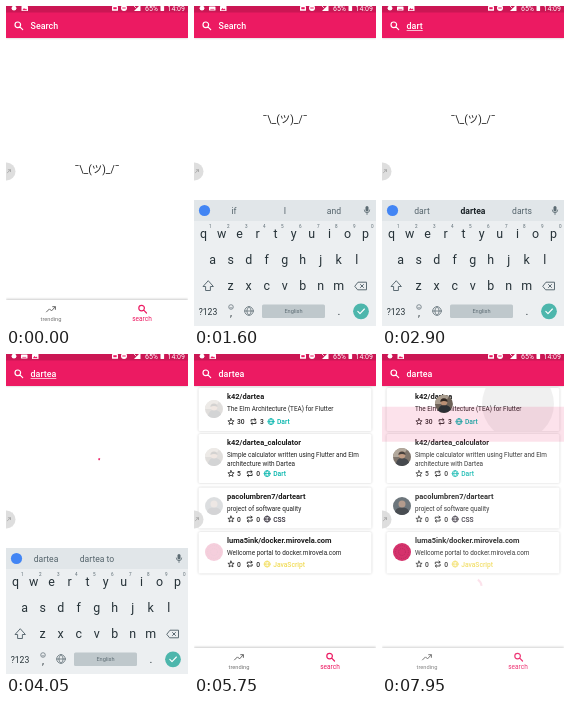
These frames come from a looping animation (182x320 px, 8000 ms). An HTML page:

```html
<!DOCTYPE html>
<html lang="en">
<head>
<meta charset="utf-8">
<title>Repository search</title>
<style>
  html, body { margin: 0; width: 100%; height: 100%; overflow: hidden; background: #fff; }
  svg { display: block; width: 182px; height: 320px; }
  text { font-family: Roboto, "Noto Sans CJK JP", "Noto Sans CJK", sans-serif; white-space: pre; }
  .mid { text-anchor: middle; }
  .bold { font-weight: 700; }
  .semi { font-weight: 500; }
  .line { fill: none; stroke: currentColor; stroke-linecap: round; stroke-linejoin: round; }
  .card { fill: #fff; filter: drop-shadow(0 .6px .8px rgba(0, 0, 0, .2)); }
</style>
</head>
<body>
<svg id="stage" viewBox="0 0 182 320" xmlns="http://www.w3.org/2000/svg"></svg>
<script>
const PINK = '#ec1a62', LOOP = 8000;
const stage = document.getElementById('stage');

const text = (x, y, size, str, fill = '#222', cls = '') =>
  `<text x="${x}" y="${y}" font-size="${size}" fill="${fill}" class="${cls}">${str}</text>`;
const rect = (x, y, w, h, fill, extra = '') =>
  `<rect x="${x}" y="${y}" width="${w}" height="${h}" fill="${fill}" ${extra}/>`;
const dot = (x, y, r, fill, extra = '') =>
  `<circle cx="${x}" cy="${y}" r="${r}" fill="${fill}" ${extra}/>`;
const line = (x, y, d, color, w = 1) =>
  `<path class="line" transform="translate(${x} ${y})" d="${d}" color="${color}" stroke-width="${w}"/>`;
const group = (id, body, extra = '') => `<g id="${id}" ${extra}>${body}</g>`;

const LENS = 'M1.2 1.2L4 4M1.9 -.9A2.8 2.8 0 1 1 -3.7 -.9A2.8 2.8 0 1 1 1.9 -.9';
const GLOBE = 'M3 0A3 3 0 1 1 -3 0A3 3 0 1 1 3 0M-3 0H3M0 -3C-2 -1 -2 1 0 3C2 1 2 -1 0 -3';
const STAR = 'M0 -3L.9 -.9L3.1 -.8L1.4 .6L2 2.8L0 1.6L-2 2.8L-1.4 .6L-3.1 -.8L-.9 -.9Z';
const LOOPS = 'M-2.4 -.3V-1.9H2.3M1.2 -3L2.4 -1.9L1.2 -.8M2.4 .3V1.9H-2.3M-1.2 3L-2.4 1.9L-1.2 .8';

function statusBar() {
  return rect(0, 0, 182, 6.5, '#000', 'opacity=".14"') +
    dot(8, 2.2, 2.4, '#fff') +
    group('kbIcon', rect(15, .5, 6.5, 4, '#fff', 'rx=".6"') + rect(16.3, 2.9, 4, .7, PINK)) +
    group('picIcon', rect(15.5, 0, 6.5, 5, '#fff', 'rx=".5"') + `<path d="M16.3 4.2L18 2L19.2 3.3L20 2.6L21.2 4.2Z" fill="${PINK}"/>`) +
    rect(106, 0, 6, 4.8, '#fff', 'rx=".6"') + rect(107.3, 1.2, 3.4, 2, PINK) +
    dot(118, 2, 3, '#fff') + rect(116.3, 1.5, 3.4, 1, PINK) +
    '<path d="M128 5H134.500V-1.500Z" fill="#fff"/>' + line(128, 1, 'M0 -1L2 1', '#fff', .8) +
    text(139, 4.7, 7, '65%', '#fff') + rect(154.5, 0, 3.6, 5, '#fff', 'rx=".4"') +
    text(161.5, 4.7, 7, '14:09', '#fff');
}

// Flat stand-ins for the profile pictures, centred on the origin
const AVATARS = [
  dot(0, 0, 9, '#6d6258') + '<path d="M-9 0A9 9 0 0 1 5 -7.500L0 0Z" fill="#a99d8f"/>' +
    '<path d="M-6 6.700Q-5 1 0 1Q6 1 7 5.600A9 9 0 0 1 -6 6.700Z" fill="#2c3035"/>' +
    dot(0, -2, 3.4, '#b98f74') + '<path d="M-3.600 -2A3.600 3.600 0 0 1 3.600 -2Q0 -4 -3.600 -2Z" fill="#2f2723"/>',
  dot(0, 0, 9, '#59636a') + '<path d="M-7 5.600Q-6 1.500 0 1.500Q6 1.500 7 5.600A9 9 0 0 1 -7 5.600Z" fill="#30343a"/>' + dot(0, -2, 3.5, '#a98d7d'),
  dot(0, 0, 9, '#cf1557') + dot(0, 0, 6.5, 'none', 'stroke="#b30f4b" stroke-width="1" stroke-dasharray="1 1"') +
    dot(0, 0, 3.5, 'none', 'stroke="#b30f4b" stroke-width="1" stroke-dasharray="1 1"')
];

const REPOS = [
  { top: 34, h: 43, name: 'k42/dartea', desc: ['The Elm Architecture (TEA) for Flutter'], stars: 30, forks: 3, lang: 'Dart', color: '#00b4ab', face: 0, cy: 55 },
  { top: 80, h: 49, name: 'k42/dartea_calculator', desc: ['Simple calculator written using Flutter and Elm', 'architecture with Dartea'], stars: 5, forks: 0, lang: 'Dart', color: '#00b4ab', face: 0, cy: 103 },
  { top: 133.5, h: 41, name: 'pacolumbren7/darteart', desc: ['project of software quality'], stars: 0, forks: 0, lang: 'CSS', color: '#2f2a36', face: 1, cy: 152 },
  { top: 178, h: 41.5, name: 'luma5ink/docker.mirovela.com', desc: ['Wellcome portal to docker.mirovela.com'], stars: 0, forks: 0, lang: 'JavaScript', color: '#f1dc5a', face: 2, cy: 198 }
];

function card(r, i) {
  const base = r.top + 11.2, foot = r.top + r.h - 9.4;
  const x = 52 + 3.8 * (String(r.stars).length - 1);
  const stat = (at, str, color = '#222') => text(at, foot + 2.4, 6.7, str, color, 'semi');
  return rect(4.5, r.top, 173, r.h, '#fff', 'class="card" rx="1.5"') +
    text(33, base, 7.5, r.name, '#1c1c1c', 'bold') +
    r.desc.map((d, n) => text(33, base + 12 + n * 8.3, 6.4, d)).join('') +
    line(37, foot, STAR, '#222', .8) + stat(43, r.stars) +
    line(x + 3.7, foot, LOOPS, '#222', .9) + stat(x + 10.2, r.forks) +
    line(x + 21.2, foot, GLOBE, r.color, .8) + stat(x + 27.2, r.lang, r.color) +
    group('face' + i, AVATARS[r.face], `transform="translate(20 ${r.cy})"`);
}

function keyboard() {
  const ink = '#263238', soft = '#5c6b73';
  let out = rect(0, 194, 182, 126, '#eceff1') + rect(0, 194, 182, 21, '#e1e6e9') +
    dot(10.5, 204.5, 5.6, '#4285f4') +
    rect(171.500, 200, 3, 5.5, soft, 'rx="1.5"') + line(173, 204, 'M-2.700 0A2.700 2.700 0 0 0 2.700 0M0 2.700V4.500', soft, .8);
  [40, 91, 140].forEach((x, i) => out += text(x, 207.8, 8.6, '', '#55646c', 'mid').replace('<text', `<text id="hint${i}"`));
  const row = (keys, x0, y) => [...keys].forEach((k, i) => out += text(x0 + i * 18, y, 12.4, k, ink, 'mid'));
  row('qwertyuiop', 9.6, 231.5);
  row('asdfghjkl', 18.7, 257.5);
  row('zxcvbnm', 36.7, 283.5);
  [...'1234567890'].forEach((n, i) => out += text(16.3 + i * 18, 222, 4.6, n, soft, 'mid'));
  return out +
    line(14, 280, 'M0 -5L-5 .500H-2.400V4.500H2.400V.500H5Z', soft, 1) +
    line(167, 280, 'M-6 0L-3 -3.800H5.500V3.800H-3ZM-.500 -1.500L2.500 1.500M2.500 -1.500L-.500 1.500', soft, 1) +
    text(14, 308.5, 8.6, '?123', ink, 'mid') +
    dot(37, 301, 2.3, 'none', `stroke="${soft}" stroke-width=".7"`) + line(37, 301, 'M-1 .700Q0 1.500 1 .700', soft, .6) +
    text(37, 310, 10, ',', ink, 'mid') +
    line(55, 305, 'M4.300 0A4.300 4.300 0 1 1 -4.300 0A4.300 4.300 0 1 1 4.300 0M-4.300 0H4.300M0 -4.300C-2.800 -1.500 -2.800 1.500 0 4.300C2.800 1.500 2.800 -1.500 0 -4.300', soft, .8) +
    rect(68, 298.5, 63, 13.5, '#bfc8cc', 'rx="1.5"') + text(99.5, 307.4, 5.6, 'English', soft, 'mid') +
    text(145, 308.5, 11, '.', ink, 'mid') +
    dot(167, 305.3, 7.9, '#4db6ac') + line(167, 305.3, 'M-3.200 0L-1 2.300L3.400 -2.300', '#fff', 1.1);
}

stage.innerHTML =
  '<clipPath id="firstCard"><rect x="4.500" y="34" width="173" height="43"/></clipPath>' +
  rect(0, 0, 182, 320, '#fff') +
  group('shrug', text(91, 3.5, 10.4, '¯\\_(ツ)_/¯', '#222', 'mid')) +
  `<path id="spin" fill="none" stroke="${PINK}" stroke-width="2"/>` +
  group('cards', REPOS.map(card).join('')) +
  dot(136, 50, 0, '#000', 'id="ripple" opacity=".06" clip-path="url(#firstCard)"') +
  rect(0, 294, 182, 26, '#fff', 'style="filter:drop-shadow(0 -.6px 1px rgba(0,0,0,.2))"') +
  line(45, 303.2, 'M-4.500 2.700L-1.500 -.300L.500 1.700L4.200 -2.300M1.700 -2.500H4.400V.200', '#666', 1) +
  text(45, 315, 5.7, 'trending', '#757575', 'mid') +
  line(136.5, 303, LENS, PINK, 1.2) + text(136, 314.7, 6.5, 'search', PINK, 'mid') +
  group('keys', keyboard()) +
  rect(0, 0, 182, 32, PINK, 'style="filter:drop-shadow(0 .5px .8px rgba(0,0,0,.25))"') +
  statusBar() + line(12.7, 19.7, LENS, '#fff', 1.2) +
  '<text id="query" class="semi" x="24.600" y="23" font-size="8.900" fill="#fff"></text>' +
  rect(24.6, 24.3, 10, .7, '#fff', 'id="under"') +
  group('page', rect(0, 0, 182, 320, '#fff') + rect(0, 0, 182, 35, PINK) +
    `<path id="load" fill="none" stroke="${PINK}" stroke-width="2"/>`) +
  group('hero', AVATARS[0]) +
  dot(.5, 165.5, 9, '#d8d8d8', 'opacity=".85"') + line(3.5, 165, 'M-2 1.600L1 -1.200M-1.200 -1.200H1V.600', '#a8a8a8', .9);

const el = {};
for (const node of stage.querySelectorAll('[id]')) el[node.id] = node;
const show = (id, on) => { el[id].style.display = on ? '' : 'none'; };
const move = (id, x, y) => el[id].setAttribute('transform', `translate(${x} ${y})`);
const part = (t, a, b) => Math.min(1, Math.max(0, (t - a) / (b - a)));

function bezier(x1, y1, x2, y2) {
  const at = (a, b, s) => 3 * a * s * (1 - s) ** 2 + 3 * b * s * s * (1 - s) + s ** 3;
  return x => {
    if (x <= 0 || x >= 1) return x;
    let lo = 0, hi = 1;
    for (let i = 0; i < 18; i++) {
      const m = (lo + hi) / 2;
      if (at(x1, x2, m) < x) lo = m; else hi = m;
    }
    return at(y1, y2, (lo + hi) / 2);
  };
}
const swift = bezier(.4, 0, .2, 1), easeIn = bezier(.42, 0, 1, 1);

// Material progress ring: head runs ahead, then the tail catches up
function ring(cx, cy, cycles) {
  const step = Math.floor(cycles), u = cycles - step;
  const head = swift(part(u, 0, .5)), tail = swift(part(u, .5, 1));
  const a = Math.PI * (-.5 + 1.5 * tail + 1.7 * u - .8 * step);
  const sweep = Math.max(.18, Math.PI * 1.5 * (head - tail));
  const p = k => `${cx + 8.6 * Math.cos(k)} ${cy + 8.6 * Math.sin(k)}`;
  return `M${p(a)}A8.6 8.6 0 ${sweep > Math.PI ? 1 : 0} 1 ${p(a + sweep)}`;
}

const TYPING = [
  [0, '', '', '', ''],
  [1300, '', 'if', 'I', 'and'],
  [1700, 'd', 'd', 'do', 'did'],
  [1950, 'da', 'da', 'day', 'dad'],
  [2300, 'dar', 'dar', 'dare', 'dark'],
  [2750, 'dart', 'dart', 'dartea', 'darts'],
  [3100, 'darte', 'darte', 'dartea', 'dartes'],
  [3350, 'dartea', 'dartea', 'dartea to', '']
];

function draw(t) {
  const up = swift(part(t, 600, 1000)) * (1 - swift(part(t, 4250, 4550)));
  const open = up > 0, drop = 126 * (1 - up);
  const mid = 32 + (Math.min(294, 194 + drop) - 32) / 2;
  const [, word, ...hints] = TYPING.filter(s => s[0] <= t).pop();

  show('keys', open);
  move('keys', 0, drop);
  hints.forEach((h, i) => { el['hint' + i].textContent = h; });
  const strong = t >= 1700 && t < 3350;
  el.hint1.setAttribute('class', strong ? 'mid bold' : 'mid');
  el.hint1.setAttribute('fill', strong ? '#1c2428' : '#55646c');
  show('kbIcon', open);
  move('picIcon', open ? 10.5 : 0, 0);

  el.query.textContent = word || 'Search';
  show('under', word && t < 4250);
  if (word) el.under.setAttribute('width', el.query.getComputedTextLength());

  show('shrug', t < 3850);
  move('shrug', 0, mid + .5);
  const busy = t >= 4020 && t < 5550;
  show('spin', busy);
  if (busy) el.spin.setAttribute('d', ring(91, mid + .5, (t - 4020) / 980));

  show('cards', t >= 5550);
  const seen = part(t, 5700, 5950), leaving = t >= 7800;
  REPOS.forEach((r, i) => { el['face' + i].style.opacity = i === 0 && leaving ? 0 : seen; });
  el.ripple.setAttribute('r', 36 * part(t, 7640, 7940));

  show('page', leaving);
  show('hero', leaving);
  if (leaving) {
    const k = part(t, 7800, 8320), p = swift(k);
    move('page', 0, 80 * (1 - p));
    el.page.style.opacity = easeIn(k);
    el.load.setAttribute('d', ring(91, 180, (t - 7800) / 1333));
    move('hero', 20 + 123 * p, 55 - 15 * p);
  }
}

function tick() {
  draw(performance.now() % LOOP);
  requestAnimationFrame(tick);
}
tick();
</script>
</body>
</html>
```
